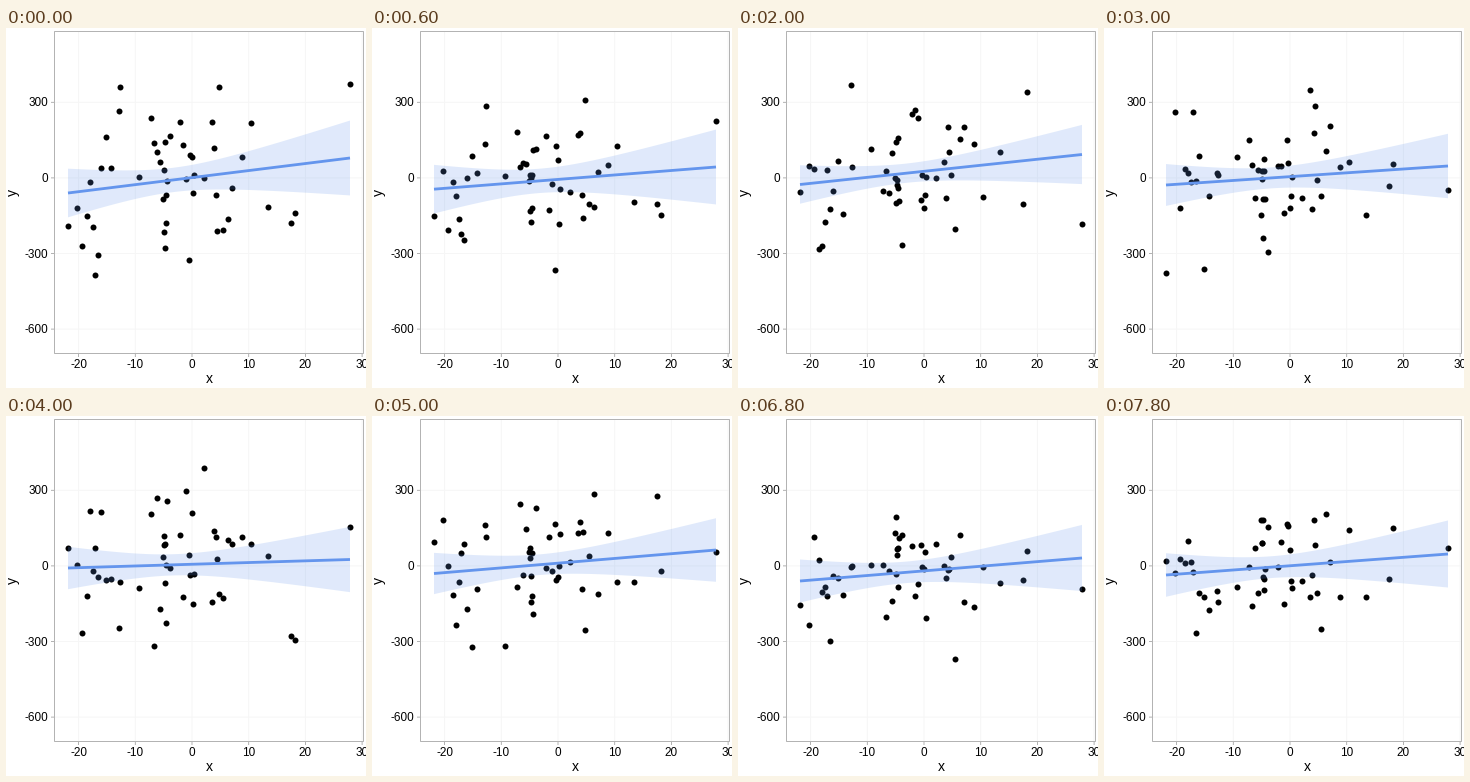
Write a matplotlib script that moves like this. It is 360 px wide and 360 px high and loops after 8000 ms.

```python
import numpy as np
import matplotlib.pyplot as plt
from matplotlib.animation import FuncAnimation

plt.rcParams["path.snap"] = False

SIZE = 360
LEFT, RIGHT, TOP, BOTTOM = 48.5, 357.5, 3.5, 325.5
BLUE = "#6495ed"
COUNT = 50

# All coordinates are stage pixels, y pointing down.
# Sorted point positions, interpolated between a few ranks.
RANKS = [0, 1, 3, 8, 10, 11, 12, 13, 14, 18, 25, 26, 27, 30, 34, 35, 36, 40,
         43, 45, 46, 47, 48, 49]
PLACES = [62, 71, 81, 95, 104.5, 112.5, 113.5, 133, 144.5, 157, 160.5, 164,
          174, 183, 188, 198, 206, 213, 226, 245, 262, 285, 289, 344]
X = np.interp(np.arange(COUNT), RANKS, PLACES)

# Per sample: fit at the left and right end, band width, outliers by rank.
SAMPLES = [
    (165, 130, 86, {11: 83, 30: 232, 49: 56}),
    (153.5, 157, 86, {1: 68, 28: 311, 49: 168}),
    (156.5, 126.5, 68, {3: 221, 11: 57, 49: 196}),
    (157, 138, 74, {}),
    (152, 143.5, 75, {35: 52, 47: 220, 49: 111}),
    (157.5, 134, 73, {41: 140, 43: 178, 49: 136}),
    (166.5, 142, 75, {41: 208, 43: 258, 49: 188}),
    (163.5, 142, 77, {41: 278, 43: 114, 49: 158}),
    (154.5, 134, 77, {41: 147, 43: 178, 49: 106}),
]


def sample(seed, left, right, spread, outliers):
    """Noise around the fit line, scaled to agree with the band."""
    noise = np.random.default_rng(seed).normal(size=COUNT).clip(-2.1, 2.1)
    noise -= np.polyval(np.polyfit(X, noise, 1), X)
    sigma = spread / 2.01
    y = np.interp(X, [X[0], X[-1]], [left, right]) + sigma * noise / noise.std()
    for rank, place in outliers.items():
        y[rank] = place
    return np.array([*y, left, right, spread])


STATES = [sample(seed, *row) for seed, row in enumerate(SAMPLES)]

fig = plt.figure(figsize=(SIZE / 72, SIZE / 72), dpi=72, facecolor="white")
ax = fig.add_axes([0, 0, 1, 1])
ax.set_xlim(0, SIZE)
ax.set_ylim(SIZE, 0)
ax.axis("off")


def line(xs, ys, color, width=1):
    ax.plot(xs, ys, color=color, lw=width, solid_capstyle="butt")


def label(x, y, text, size=11.7, ha="center", va="baseline", **kw):
    ax.text(x, y, text, fontsize=size, family="Liberation Sans",
            color="black", ha=ha, va=va, **kw)


GRID, TICK = "#f6f6f6", "#a0a0a0"
for v in range(-20, 31, 10):
    x = 186 + 5.67 * v
    line([x, x], [TOP, BOTTOM], GRID)
    line([x, x], [BOTTOM, BOTTOM + 3.5], TICK, 0.8)
    label(x, 340.5, str(v))
for v in range(-600, 301, 300):
    y = 149.9 - 0.252 * v
    line([LEFT, RIGHT], [y, y], GRID)
    line([LEFT - 3.5, LEFT], [y, y], TICK, 0.8)
    label(42.2, y + 4.2, str(v), ha="right")
label(203, 355, "x", 14)
label(7, 164.5, "y", 14, va="center", rotation=90)

dots = ax.scatter(X, X, s=6 ** 2, c="black", linewidths=0, zorder=3)
band, = ax.fill([0], [0], color=BLUE, alpha=0.2, lw=0, zorder=4)
fit, = ax.plot([], [], color=BLUE, lw=2.8, solid_capstyle="butt", zorder=5)
ax.add_patch(plt.Rectangle((LEFT, TOP), RIGHT - LEFT, BOTTOM - TOP,
                           fill=False, ec="#b3b3b3", lw=1, zorder=6))

# Confidence band of a straight fit: narrowest at the mean of X.
xs = np.linspace(X[0], X[-1], 80)
offset = X - X.mean()
shape = np.sqrt(1 / COUNT + (xs - X.mean()) ** 2 / (offset ** 2).sum())


def pose(i):
    """Four held steps and one halfway step per state; the first has two."""
    n, step = divmod(i, 5)
    if n == 0:
        t = max(0, step - 2) / 3
    else:
        t = 0.5 if step == 4 else 0
    return STATES[n] * (1 - t) + STATES[n + 1] * t


def draw(i):
    state = pose(i)
    left, right, spread = state[-3:]
    mid = np.linspace(left, right, len(xs))
    half = spread * shape
    dots.set_offsets(np.column_stack([X, state[:-3]]))
    band.set_xy(np.column_stack([np.r_[xs, xs[::-1]],
                                 np.r_[mid - half, (mid + half)[::-1]]]))
    fit.set_data(xs, mid)
    return dots, band, fit


anim = FuncAnimation(fig, draw, frames=40, interval=200, repeat=True,
                     repeat_delay=0)
plt.show()
```
